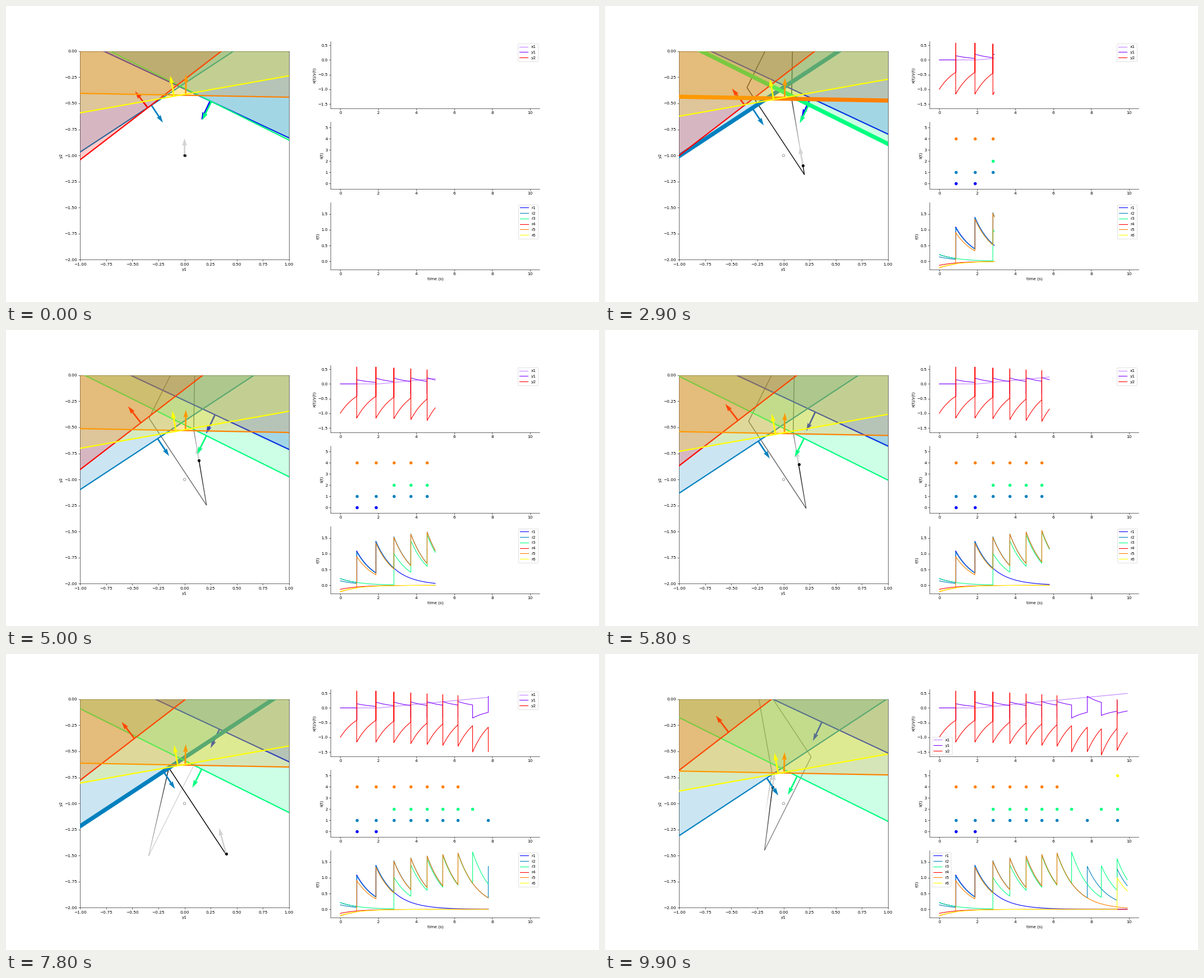
These frames come from a looping animation (1058x529 px, 10 s). A matplotlib script:

```python
import numpy as np
import matplotlib.pyplot as plt
from matplotlib.animation import FuncAnimation
from matplotlib.collections import LineCollection

DT = 0.001
STEPS = 10000
PER_FRAME = 100
TRAIL = 1000
N_INH = 3

# Unit decoding vectors: three inhibitory units, then three excitatory ones.
D = np.array([[-0.4246, -0.9054], [0.55, -0.835], [-0.4455, -0.895],
              [-0.61, 0.792], [0.0185, 1.0], [-0.175, 0.985]])
D /= np.linalg.norm(D, axis=1, keepdims=True)
UP = D * np.array([-1, -1, -1, 1, 1, 1])[:, None]
GAIN = np.array([1, -1, -1, 1, -1, -1])
THRESH = 1 / np.sqrt(3)
CENTER = np.array([0.0, -1.0])

time = np.arange(STEPS + 1) * DT
x = np.clip((time - 2) / 16, 0, None)


def bounds(xi):
    """Distance of each boundary from the center for input xi."""
    return THRESH * (1 + GAIN * xi)


def simulate():
    """Leaky rates; at most one spike per step, inhibition first."""
    r = np.zeros((STEPS + 1, 6))
    r[0] = np.linalg.pinv(D.T) @ CENTER
    spikes = []
    for k in range(STEPS):
        v = UP @ (r[k] @ D - CENTER) - bounds(x[k])
        r[k + 1] = r[k] * (1 - DT)
        unit = int(np.argmax(v[:N_INH]))
        if v[unit] <= 0:
            unit = N_INH + int(np.argmax(v[N_INH:]))
        if v[unit] > 0:
            r[k + 1, unit] += 1
            spikes.append((k, unit))
    return r, np.array(spikes)


rates, spikes = simulate()
y = rates @ D
when, who = spikes.T
knots = np.union1d(np.arange(0, STEPS + 1, 20), np.r_[when, when + 1])

colors = [plt.cm.winter(v) for v in (0.0, 0.5, 1.0)]
colors += [plt.cm.autumn(v) for v in (0.0, 0.5, 1.0)]
violet, red = plt.cm.rainbow(0.0), plt.cm.rainbow(1.0)

fig = plt.figure(figsize=(20, 10), dpi=52.9)
grid = fig.add_gridspec(3, 2)

# Latent space
ax = fig.add_subplot(grid[:, 0])
ax.set_aspect("equal")
ax.set(xlim=(-1, 1), ylim=(-2, 0), xlabel="y1", ylabel="y2")

trail = LineCollection([], linewidths=2, zorder=2)
ax.add_collection(trail, autolim=False)
leak = ax.quiver(0, -1, 0, 1, scale=12, width=0.0075, color="lightgray",
                 zorder=2.1)
dot = ax.scatter([0], [-1], color="k", zorder=2.2)
ax.scatter([0], [-1], facecolors="none", edgecolors="gray", linewidths=1,
           zorder=2.3)

edge = np.array([-1.0, 1.0])
fills, lines, arrows = [], [], []
for i, c in enumerate(colors):
    z = 3 + i
    fills += ax.fill([-1, 1, 1, -1], [0, 0, 5, 5], color=c, alpha=0.2, lw=0,
                     zorder=z)
    lines += ax.plot(edge, edge, color=c, lw=3, zorder=z + 0.1)
    arrows.append(ax.quiver(0, -1, *D[i], scale=10, width=0.0075, color=c,
                            zorder=z + 0.2))
ax.set(xlim=(-1, 1), ylim=(-2, 0))


def time_axes(row, label, low, high):
    a = fig.add_subplot(grid[row, 1])
    a.spines[["top", "right"]].set_visible(False)
    a.set(xlim=(-0.5, 10.5), ylim=(low, high), ylabel=label)
    return a


ax_y = time_axes(0, "x(t)/y(t)", y.min() - 0.05, y.max() + 0.05)
ax_s = time_axes(1, "s(t)", -0.5, 5.5)
ax_r = time_axes(2, "r(t)", rates.min() - 0.05, rates.max() + 0.05)
ax_r.set_xlabel("time (s)")

curves = []


def add_curve(a, data, **style):
    curves.append((a.plot([], [], **style)[0], data))


add_curve(ax_y, x, color=violet, alpha=0.5, label="x1")
add_curve(ax_y, y[:, 0], color=violet, label="y1")
add_curve(ax_y, y[:, 1], color=red, label="y2")
for i, c in enumerate(colors):
    add_curve(ax_r, rates[:, i], color=c, label=f"r{i + 1}")
ax_y.legend(loc="best")
ax_r.legend(loc="best")
marks = [ax_s.plot([], [], "o", color=c, ms=6, mew=1.5)[0] for c in colors]


def draw_trail(n):
    start = max(0, n - TRAIL)
    idx = knots[(knots >= start) & (knots <= n)]
    pts = y[idx]
    trail.set_segments(np.stack([pts[:-1], pts[1:]], axis=1))
    rgba = np.zeros((max(len(idx) - 1, 0), 4))
    rgba[:, 3] = 1 - (n - (idx[:-1] + idx[1:]) / 2) / TRAIL
    trail.set_color(rgba)


def draw_boundaries(n):
    dist = bounds(x[n])
    recent = who[(when > n - PER_FRAME) & (when <= n)]
    for i in range(6):
        ux, uy = UP[i]
        left, right = level = CENTER[1] + (dist[i] - ux * edge) / uy
        lines[i].set_ydata(level)
        lines[i].set_linewidth(10 if i in recent else 3)
        fills[i].set_xy([(-1, left), (1, right), (1, 5), (-1, 5)])
        arrows[i].set_offsets([CENTER + dist[i] * UP[i]])


def update(frame):
    n = frame * PER_FRAME
    draw_trail(n)
    draw_boundaries(n)
    dot.set_offsets([y[n]])
    leak.set_offsets([y[n]])
    leak.set_UVC(-y[n, 0], -y[n, 1])
    for line, data in curves:
        line.set_data(time[:n + 1], data[:n + 1])
    for i, mark in enumerate(marks):
        t = when[(who == i) & (when <= n)] * DT
        mark.set_data(t, np.full(len(t), i))
    return []


anim = FuncAnimation(fig, update, frames=STEPS // PER_FRAME, interval=100,
                     repeat=True, repeat_delay=0, init_func=lambda: update(0))
plt.show()
```
